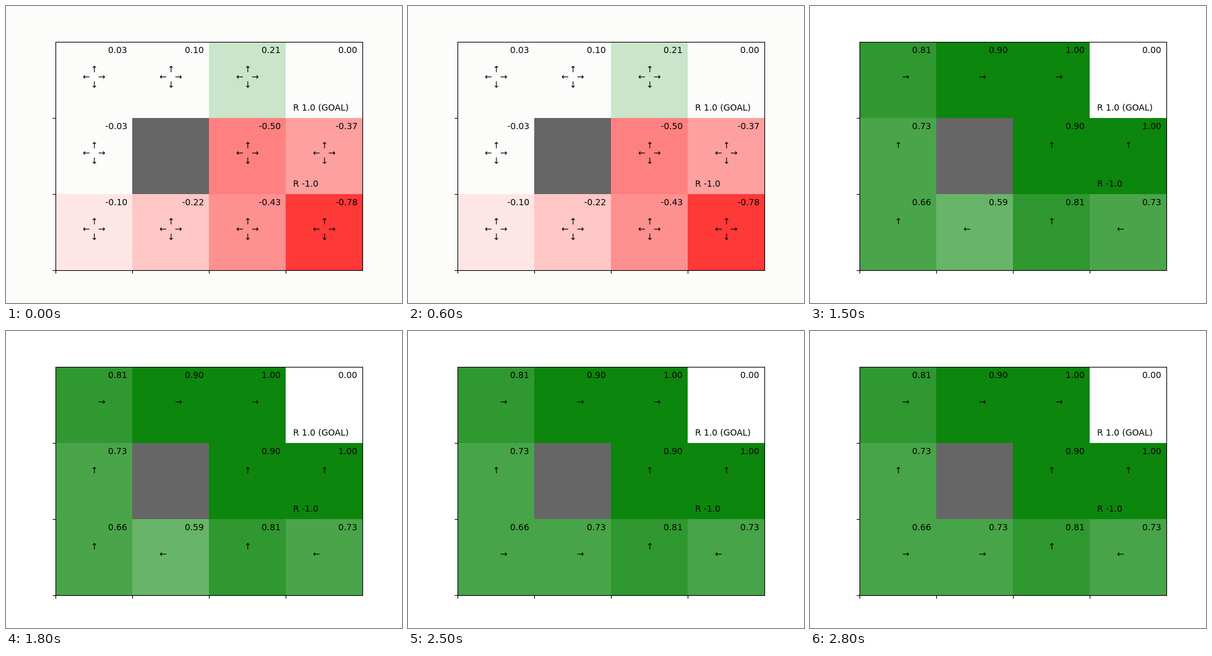
Animation, 640 px wide and 480 px high, one loop 3000 ms. Source, as a matplotlib script:

```python
import matplotlib.pyplot as plt
import numpy as np
from matplotlib.animation import FuncAnimation
from matplotlib.colors import LinearSegmentedColormap
from matplotlib.patches import Rectangle

ROWS, COLS = 3, 4
WALL, GOAL = (1, 1), (0, 3)
REWARDS = {(0, 3): "R 1.0 (GOAL)", (1, 3): "R -1.0"}
ARROWS = {
    "U": ("↑", 0, 0.1),
    "D": ("↓", 0, -0.1),
    "L": ("←", -0.1, 0),
    "R": ("→", 0.1, 0),
}

# Values in the same band share one averaged shade
BANDS = [-0.7, -0.47, -0.4, -0.3, -0.15, -0.05, 0.15, 0.3, 0.5, 0.62, 0.75, 0.85]
BLANK = 6
CMAP = LinearSegmentedColormap.from_list("value", ["red", "white", "green"])
WARM_WHITE = (252 / 255, 253 / 255, 251 / 255)
WHITE = (1, 1, 1)

START = [
    [0.03, 0.10, 0.21, 0],
    [-0.03, 0, -0.50, -0.37],
    [-0.10, -0.22, -0.43, -0.78],
]
SOLVED = [[0.81, 0.90, 1, 0], [0.73, 0, 0.90, 1]]

# Values, greedy policy by row (None: all actions), paper colour
STEPS = [
    (START, None, WARM_WHITE),
    (SOLVED + [[0.66, 0.59, 0.53, 0.48]], "RRR. U.UU ULLL", WHITE),
    (SOLVED + [[0.66, 0.59, 0.81, 0.73]], "RRR. U.UU ULUL", WHITE),
    (SOLVED + [[0.66, 0.73, 0.81, 0.73]], "RRR. U.UU URUL", WHITE),
    (SOLVED + [[0.66, 0.73, 0.81, 0.73]], "RRR. U.UU RRUL", WHITE),
]

plt.rcParams["font.family"] = "DejaVu Sans"
plt.rcParams["font.size"] = 10
fig = plt.figure(figsize=(6.4, 4.8), dpi=100)
paper = Rectangle((0, 0), 1, 1, transform=fig.transFigure, lw=0, zorder=-1)
fig.add_artist(paper)
ax = fig.add_axes([0.125, 0.11, 0.775, 0.77])


def shades(values, blank):
    band = np.digitize(values, BANDS)
    rgb = np.empty((ROWS, COLS, 3))
    for b in np.unique(band):
        cells = band == b
        rgb[cells] = blank if b == BLANK else CMAP(0.5 + values[cells].mean() / 2)[:3]
    return rgb


def setup_axes():
    ax.clear()
    ax.set(xlim=(0, COLS), ylim=(0, ROWS), xticks=range(COLS), yticks=range(ROWS))
    ax.tick_params(labelbottom=False, labelleft=False)


def draw_cell(row, col, value, actions):
    top = ROWS - row
    if (row, col) in REWARDS:
        ax.text(col + 0.1, top - 0.9, REWARDS[row, col])
    if (row, col) == WALL:
        ax.add_patch(Rectangle((col, top - 1), 1, 1, fc=(0.4, 0.4, 0.4), lw=0))
        return
    ax.text(col + 0.4, top - 0.15, f"{value:12.2f}")
    if (row, col) == GOAL:
        return
    for action in actions:
        glyph, dx, dy = ARROWS[action]
        ax.text(col + 0.45 + dx, top - 0.5 + dy, glyph)


def update(i):
    grid, policy, blank = STEPS[max(0, i - 1)]
    values = np.array(grid, dtype=float)
    paper.set_facecolor(blank)
    setup_axes()
    ax.pcolormesh(shades(values, blank)[::-1])
    rows = policy.split() if policy else None
    for row, col in np.ndindex(ROWS, COLS):
        actions = rows[row][col] if rows else "UDLR"
        draw_cell(row, col, values[row, col], actions)
    return []


anim = FuncAnimation(fig, update, frames=6, interval=500, repeat=True, repeat_delay=0)
plt.show()
```
